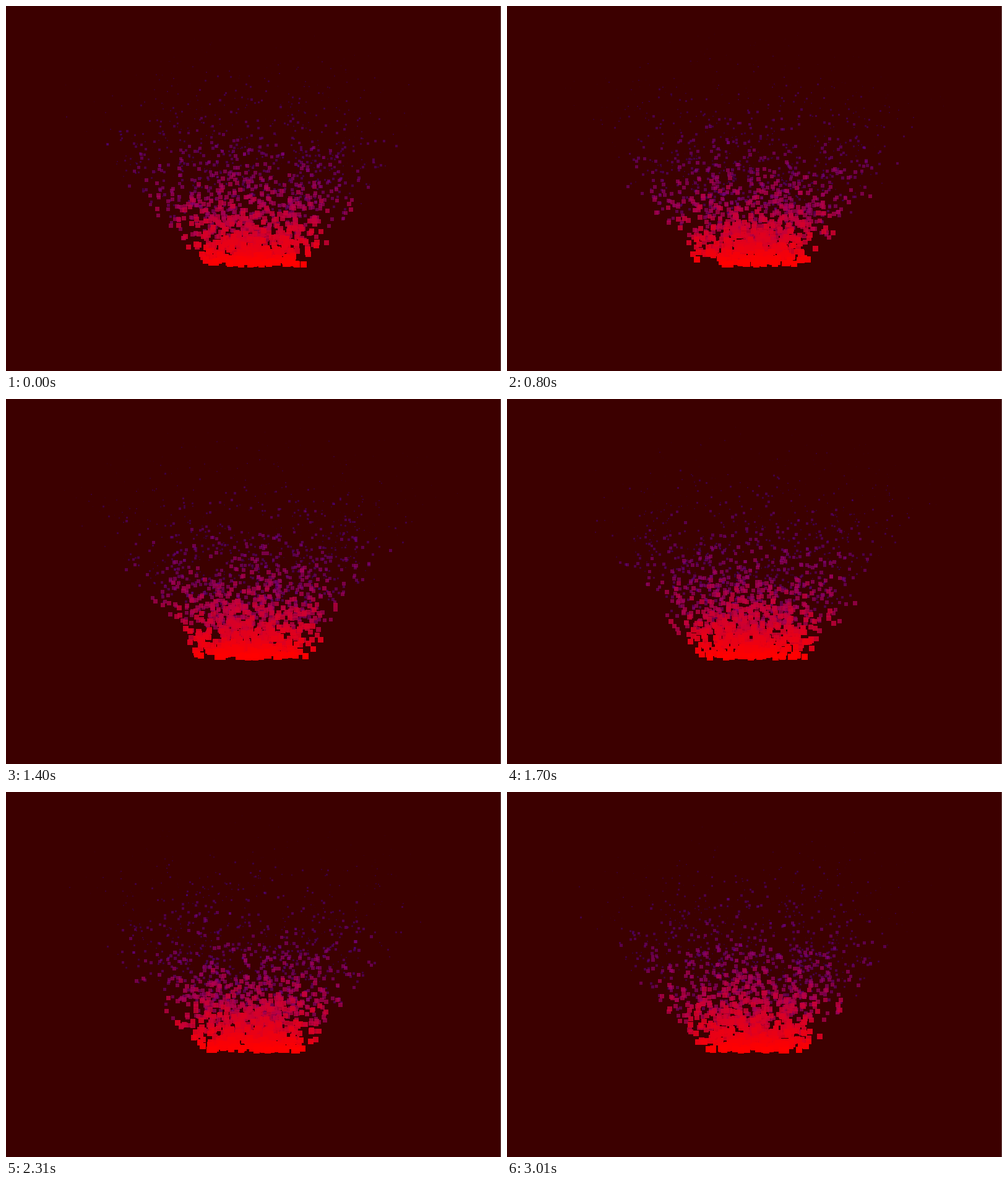
An HTML page with a canvas that plays this animation: 800 px wide and 589 px high, repeating every 3110 ms.

```html
<!DOCTYPE html>
<html lang="en">
<head>
<meta charset="utf-8">
<title>Ember fountain</title>
<style>
html, body { margin: 0; width: 100%; height: 100%; overflow: hidden; background: #3c0000; }
canvas { display: block; }
</style>
</head>
<body>
<canvas id="stage" width="800" height="589"></canvas>
<script>
const ctx = document.getElementById('stage').getContext('2d');
const LOOP = 3110, LIFE = 1300, COUNT = 4100;
const ALIVE = Math.floor(COUNT * LIFE / LOOP);
const CX = 398, BASE = 417;

// Runs of evenly spaced picture changes: first, last, steps
const RUNS = [
  [60, 510, 7], [590, 1100, 8], [1170, 1630, 7],
  [1700, 2150, 7], [2230, 2740, 8], [2800, 3010, 4]
];
const ticks = [0];
for (const [first, last, steps] of RUNS) {
  for (let i = 0; i < steps; i++) {
    ticks.push(Math.round((first + (last - first) * i / (steps - 1)) / 10) * 10);
  }
}

let seed = 4177;
function random() {
  seed = (seed + 0x6D2B79F5) | 0;
  let n = Math.imul(seed ^ (seed >>> 15), 1 | seed);
  n = (n + Math.imul(n ^ (n >>> 7), 61 | n)) ^ n;
  return ((n ^ (n >>> 14)) >>> 0) / 4294967296;
}
const spread = () => random() * 2 - 1;

// One ember leaves the base line at each even interval of the loop
const embers = Array.from({ length: COUNT }, () => {
  const lean = spread();
  const angle = 0.75 * Math.sign(lean) * Math.pow(Math.abs(lean), 0.8);
  const reach = 165 + 260 * random();
  return {
    x: CX + 88 * (0.35 * lean + 0.65 * spread()),
    dx: Math.sin(angle) * reach,
    dy: -Math.cos(angle) * reach
  };
});

function drawEmber(p, t) {
  const size = 10 * (1 - t);
  if (size < 0.5) return;
  const side = Math.max(1, Math.round(size));
  ctx.globalAlpha = 1 - Math.pow(t, 1.25);
  ctx.fillStyle = `rgb(${Math.round(255 * (1 - t))},0,${Math.round(255 * t)})`;
  ctx.fillRect(
    Math.round(p.x + p.dx * t - side / 2),
    Math.round(BASE + p.dy * t - side / 2),
    side, side
  );
}

function draw(time) {
  ctx.globalAlpha = 1;
  ctx.fillStyle = '#3c0000';
  ctx.fillRect(0, 0, 800, 589);
  const head = time / LOOP * COUNT;
  const newest = Math.floor(head);
  // Oldest first, so fresh embers lie on top
  for (let k = ALIVE - 1; k >= 0; k--) {
    const t = (head - newest + k) / COUNT * LOOP / LIFE;
    drawEmber(embers[(newest - k + COUNT) % COUNT], t);
  }
  ctx.globalAlpha = 1;
  ctx.fillStyle = '#6b4a4a';
  ctx.fillRect(799, 0, 1, 589);
}

let shown = -1;
function frame() {
  const now = performance.now() % LOOP;
  let tick = 0;
  for (const t of ticks) if (t <= now) tick = t;
  if (tick !== shown) draw(shown = tick);
  requestAnimationFrame(frame);
}
frame();
</script>
</body>
</html>
```
